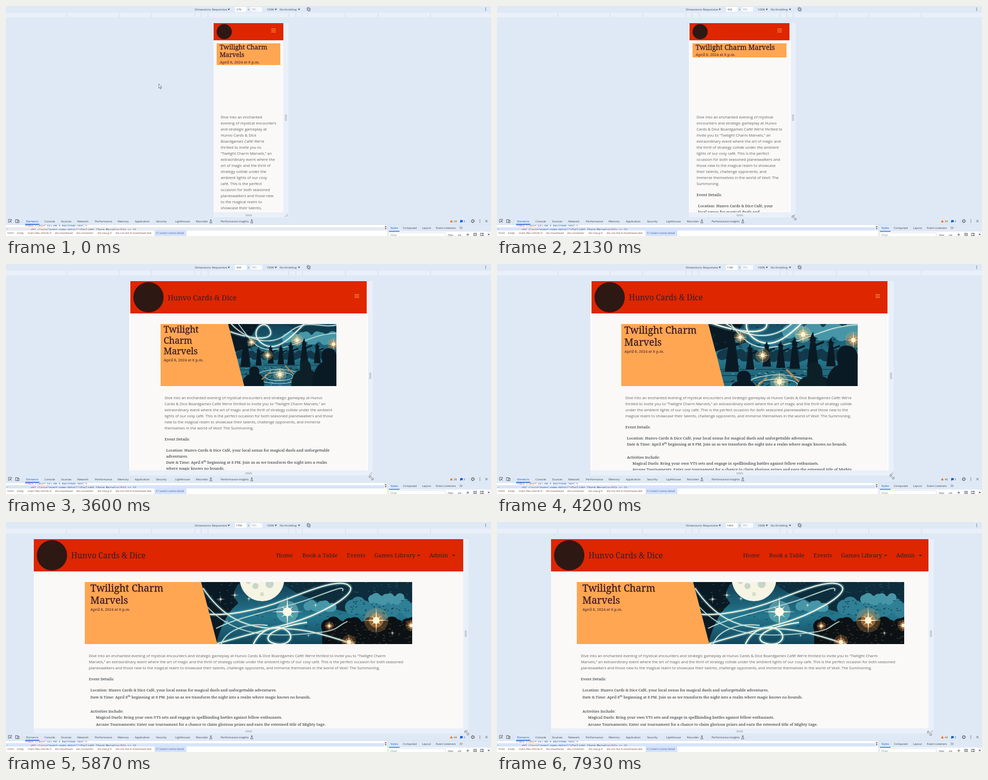
These frames come from a looping animation (960 by 456 pixels, 8 s). An HTML page:

```html
<!DOCTYPE html>
<html lang="en">
<head>
<meta charset="utf-8">
<title>Responsive event page</title>
<style>
html, body { margin: 0; width: 100%; height: 100%; overflow: hidden; background: #dfe9f6; }
#stage { position: relative; width: 960px; height: 456px; overflow: hidden; }
#stage div, #stage svg { position: absolute; }
#chrome, #art-day, #art-night { left: 0; top: 0; }
#chrome text { font-family: "Open Sans", sans-serif; white-space: pre; }
#chrome .mono { font-family: "DejaVu Sans Mono", monospace; font-size: 5.5px; }
#frame { top: 34px; height: 375px; background: #fff; overflow: hidden; }
#page { top: 0; height: 100%; background: #faf9f8; overflow: hidden; color: #212529;
  font: 7.67px/12px "Noto Serif", serif; }
#head { left: 0; top: 0; width: 100%; background: #de2600; color: #2e1f2a; }
#logo { left: 6px; top: 2px; border-radius: 50%; background: #2d1813; }
#name { left: 74px; top: 19.5px; line-height: 25px; white-space: nowrap; }
#menu { right: 15px; width: 9px; height: 1.5px; background: #ffa652; box-shadow: 0 3px #ffa652, 0 6px #ffa652; }
#nav { right: 0; top: 22px; height: 20px; font-size: 11.5px; line-height: 20px; white-space: nowrap; }
#nav i { position: absolute; top: 9px; border: 3px solid transparent; border-top-color: #2e1f2a; border-bottom: 0; }
#banner { background: #ffa652; overflow: hidden; color: #3a1a26; }
#stage #title { position: relative; -webkit-text-stroke: .3px #3a1a26; }
#stage #when { position: relative; }
#pic { top: 0; right: 0; height: 100%; clip-path: polygon(0 0, 100% 0, 100% 100%, 32px 100%); }
#pic svg { width: 100%; height: 100%; }
#body { height: 300px; }
#stage #body div { position: relative; }
#intro { color: #626266; font: 7.62px/12px "Open Sans", sans-serif; margin-bottom: 10px; }
#event { margin-bottom: 10px; }
#body .item { margin-left: 3px; }
#body .sub { margin-left: 14px; }
#acts { margin-top: 14px; }
sup { font-size: .75em; line-height: 0; vertical-align: .45em; }
.bar { background: #e9f0f9; }
.grip { background: #c9cdd5; }
</style>
</head>
<body>
<div id="stage">
  <svg id="chrome" width="960" height="456"></svg>
  <div id="right" class="bar"></div>
  <div id="bottom" class="bar"></div>
  <div id="gripR" class="grip"></div>
  <div id="gripB" class="grip"></div>
  <svg id="corner" width="8" height="8" stroke="#8a9099" stroke-width=".8"><path d="M1 7L7 1M4 7L7 4"/></svg>
  <div id="frame"><div id="page">
    <div id="head">
      <div id="logo"></div>
      <div id="name">Hunvo Cards &amp; Dice</div>
      <div id="menu"></div>
      <div id="nav"></div>
    </div>
    <div id="banner">
      <div id="title">Twilight Charm Marvels</div>
      <div id="when">April 8, 2024 at 8 p.m.</div>
      <div id="pic">
        <svg id="art-day" viewBox="0 0 214 123" preserveAspectRatio="xMidYMid slice"></svg>
        <svg id="art-night" viewBox="0 0 418 123" preserveAspectRatio="xMidYMid slice"></svg>
      </div>
    </div>
    <div id="body">
      <div id="intro"></div>
      <div id="event">Event Details:</div>
      <div id="place" class="item"></div>
      <div id="date" class="item"></div>
      <div id="acts" class="item">Activities Include:</div>
      <div id="duels" class="sub">Magical Duels: Bring your own VTS sets and engage in spellbinding battles against fellow enthusiasts.</div>
      <div class="sub">Arcane Tournaments: Enter our tournament for a chance to claim glorious prizes and earn the esteemed title of Mighty Sage.</div>
    </div>
  </div></div>
  <svg id="arrow" width="8" height="12"><path d="M.5 .5V9L2.5 7.2L3.9 10.4L5.2 9.8L3.8 6.7H6.4Z" fill="#fff" stroke="#222" stroke-width=".6"/></svg>
  <svg id="sizer" width="10" height="10"><path d="M1 1H4.5L3.4 2.1L7.9 6.6L9 5.5V9H5.5L6.6 7.9L2.1 3.4L1 4.5Z" fill="#fff" stroke="#333" stroke-width=".6"/></svg>
</div>
<script>
const $ = id => document.getElementById(id);
const place = (id, o) => {
  for (const k in o) $(id).style[k] = typeof o[k] === 'number' ? o[k] + 'px' : o[k];
};
const show = (id, on) => { $(id).style.display = on ? '' : 'none'; };

// SVG markup helpers
const rect = (x, y, w, h, fill, extra = '') => `<rect x="${x}" y="${y}" width="${w}" height="${h}" fill="${fill}" ${extra}/>`;
const text = (x, y, s, fill = '#3c4147', extra = '') => `<text x="${x}" y="${y + 2}" font-size="5.6" fill="${fill}" ${extra}>${s}</text>`;
const line = (d, color, w = .8, extra = '') => `<path d="${d}" fill="none" stroke="${color}" stroke-width="${w}" ${extra}/>`;
const shape = (d, fill) => `<path d="${d}" fill="${fill}"/>`;
const disc = (x, y, r, fill, extra = '') => `<circle cx="${x}" cy="${y}" r="${r}" fill="${fill}" ${extra}/>`;
const caret = x => shape(`M${x} 5.5h4l-2 3z`, '#3c4147');
const dots = (x, y) => [-2.5, 0, 2.5].map(d => disc(x, y + d, .7, '#3c4147')).join('');
const flask = x => line(`M${x} 424h3M${x + .8} 424v2L${x - .8} 430h4.6L${x + 2.2} 426v-2`, '#3c4147', .7);

function chrome() {
  const ink = '#3c4147', blue = '#0b57d0', edge = '#cdd9e8';
  let s = rect(0, 0, 960, 456, '#dfe9f6') + rect(0, 13.5, 960, 9, '#e9f0fa');
  for (const w of [320, 375, 425, 768, 1024, 1440])
    s += line(`M${480 - w / 4} 13.5v9M${480 + w / 4} 13.5v9`, edge, 1);
  s += text(374, 6.5, 'Dimensions: Responsive') + caret(439) +
    rect(453, 2, 23, 9.5, '#fff', 'rx="1"') + text(461, 6.5, '276', ink, 'id="wide" text-anchor="middle"') +
    text(478.5, 6.5, '×') + rect(484, 2, 23, 9.5, '#f8fafd', 'rx="1"') +
    text(491, 6.5, '751', '#8b9097', 'text-anchor="middle"') +
    text(516, 6.5, '100%') + caret(532) + text(542, 6.5, 'No throttling') + caret(578) +
    rect(597.3, 3.5, 3.4, 6, 'none', `rx=".8" stroke="${ink}" transform="rotate(45 599 6.5)"`) +
    line('M595.3 5.5a4 4 0 0 1 3.4 -3.3M602.7 7.5a4 4 0 0 1 -3.4 3.3', ink) + dots(949.5, 6.5);

  // elements panel
  const tag = '#8e2450', attr = '#9a5220', val = '#1f4fa3';
  const span = (c, t) => `<tspan fill="${c}">${t}</tspan>`;
  const open = (n, c) => span(tag, '&lt;' + n) + span(attr, ' class') + span(tag, '="') + span(val, c) + span(tag, '"&gt;');
  s += rect(0, 433, 960, 23, '#fff') + rect(0, 438.5, 748, 6, '#e7eaef', 'id="row"') +
    text(38, 434.5, '▾' + open('div', 'col-md-4 masthead-text'), ink, 'class="mono"') +
    text(49, 443, open('h1', 'event-name-detail') + 'Twilight Charm Marvels' + span(tag, '&lt;/h1&gt;') + span('#777', ' == $0'), ink, 'class="mono"') +
    text(0, 441, '…', ink) + rect(748, 433, 7, 11.5, '#f2f4f7') +
    shape('M749.5 438.5h4l-2 -2.5zM749.5 440.5h4l-2 2.5z', '#555') +
    rect(0, 444.5, 755, 11.5, '#fff') + line('M0 444.5H755', edge, .6);
  s += rect(294, 444.5, 63, 11.5, '#d3e3fd');
  const crumbs = [[3, 'html'], [22, 'body'], [43, 'main.flex-shrink-0'], [97, 'div.masthead'], [139, 'div.container'],
    [181, 'div.row.g-0'], [217, 'div.col-md-4.masthead-text']];
  for (const [x, t] of crumbs) s += text(x, 450, t, '#7a5142');
  s += text(297, 450, 'h1.event-name-detail', '#5a5f9c');

  // tab bar
  s += rect(0, 420, 960, 13.5, '#dfe9f6') + line('M0 433.5H960', edge, .7);
  const tabs = [[76, 'Console'], [109, 'Sources'], [141, 'Network'], [176, 'Performance'], [221, 'Memory'], [255, 'Application'],
    [297, 'Security'], [335, 'Lighthouse'], [376, 'Recorder'], [425, 'Performance insights']];
  for (const [x, t] of tabs) s += text(x, 426.5, t);
  s += text(40, 426.5, 'Elements', blue) + rect(38, 432, 28, 1.5, blue) + flask(404) + flask(485) +
    line('M11 425v-2H5v6h2M8 426l3.5 3.5M8 429v-3h3', ink) + rect(19, 423.5, 5, 6, 'none', `stroke="${ink}" stroke-width=".8"`) +
    rect(23, 425.5, 3, 4, '#dfe9f6', `stroke="${ink}" stroke-width=".8"`) + line('M32 423v8', edge) +
    shape('M881.5 424l2.8 5h-5.6z', '#e8711a') + text(886, 426.5, '34', '#8a3b00', 'id="warn"') +
    shape('M899 424.5h5v4h-3l-2 1.5z', blue) + text(905.5, 426.5, '3', blue) +
    line('M917 423v8', edge) + disc(924, 426.5, 2.4, 'none', `stroke="${ink}"`) +
    disc(924, 426.5, 3.4, 'none', `stroke="${ink}" stroke-width=".9" stroke-dasharray="1.2 1.47"`) +
    dots(938, 426.5) + line('M948.8 424.3l4.4 4.4M953.2 424.3l-4.4 4.4', ink);

  // styles pane
  s += rect(755.5, 433.5, 205, 13, '#dfe9f6') + line('M755.5 433.5V456', edge, 1) + line('M755 446.7H960', edge, .6) +
    text(761, 440, 'Styles', blue) + rect(758, 446, 21, 1.3, blue) + text(785.5, 440, 'Computed') + text(823.5, 440, 'Layout') +
    text(851, 440, 'Event Listeners') + line('M898 437.5l2.3 2.3l-2.3 2.3M901 437.5l2.3 2.3l-2.3 2.3', ink) +
    rect(757.5, 449.5, 112, 9, '#fff', `stroke="${edge}" stroke-width=".8"`) + text(761, 453.5, 'Filter', '#8b9097') +
    text(874, 453.5, ':hov') + text(893, 453.5, '.cls') + line('M914 450.5v5.5M911.2 453.3h5.6', ink) +
    rect(926, 450.5, 5, 5, 'none', `stroke="${ink}" stroke-width=".8"`) + line('M926 453h5', ink) +
    rect(939, 450.5, 6, 5, 'none', `stroke="${ink}" stroke-width=".8"`) + line('M942.5 450.5v5', ink) +
    rect(952, 447, 8, 9, '#f2f4f7') + shape('M953.5 454h4l-2 -3z', '#555');
  $('chrome').innerHTML = s;
}

// Banner art
const cream = '#f6f4e2', dark = '#0a1a24';
let seed = 7;
const rnd = (a, b) => a + (b - a) * ((seed = seed * 16807 % 2147483647) / 2147483647);
function flecks(n, x0, y0, x1, y1, color) {
  let d = '';
  while (n--) d += `M${rnd(x0, x1)} ${rnd(y0, y1)}l${rnd(1, 4)} ${rnd(-2, 2)}`;
  return line(d, color, 1, 'stroke-linecap="round"');
}
function spark(x, y, r, color = cream) {
  let d = '';
  for (let i = 0; i < 16; i++) {
    const a = i * Math.PI / 8, k = i % 2 ? .13 : i % 4 ? .5 : 1;
    d += `${i ? 'L' : 'M'}${x + Math.cos(a) * r * k} ${y + Math.sin(a) * r * k}`;
  }
  return shape(d + 'Z', color);
}
const glow = (x, y, r, c) => disc(x, y, r, c, 'opacity=".25"') + disc(x, y, r * .6, c, 'opacity=".5"') +
  disc(x, y, r * .28, '#fff3cf') + spark(x, y, r * 1.1, '#fff3cf');
const swirl = (d, w) => line(d, '#6fc0cb', w * 3, 'opacity=".35"') + line(d, cream, w);
const puffs = (x0, x1, y, r, fill) => {
  let d = '';
  for (let x = x0, i = 0; x < x1; x += r * .75, i++) d += disc(x, y - r * .4 * Math.sin(i * 1.7), r, fill);
  return d;
};
const sky = (id, w) => `<defs><linearGradient id="${id}" x2="0" y2="1"><stop offset="0" stop-color="#124056"/>` +
  `<stop offset=".55" stop-color="#25778d"/><stop offset="1" stop-color="#11445a"/></linearGradient></defs>` + rect(0, 0, w, 124, `url(#${id})`);

function nightArt() {
  let s = sky('n', 418);
  s += shape('M0 0H78Q56 22 74 42Q44 66 30 124H0Z', dark) + shape('M160 0H418V40Q340 30 300 62Q250 52 222 34Q184 24 160 0Z', '#0d2c3c');
  s += flecks(50, 0, 0, 80, 124, '#1f6478') + flecks(70, 170, 0, 418, 44, '#1c6075') + flecks(50, 90, 40, 280, 124, '#0f3c50');
  s += puffs(212, 262, 48, 9, '#4696a8') + puffs(300, 418, 50, 15, '#2f7f95') + puffs(340, 400, 34, 9, '#4696a8') + flecks(40, 290, 36, 418, 66, dark);
  s += disc(121, -6, 44, cream) + disc(108, 8, 6, '#c7d5c8') + disc(136, 4, 8, '#c7d5c8') + disc(121, 24, 4, '#d8ddcc') + disc(94, -1, 5, '#d0dacb');
  s += puffs(252, 424, 88, 14, '#0b1114') + rect(240, 92, 178, 32, '#0b1114') + flecks(90, 246, 78, 418, 123, '#5d4a32');
  s += swirl('M0 62C40 70 110 58 170 34S282 -8 295 9S232 66 176 82S70 110 30 123', 2.4) +
    swirl('M30 92C80 66 160 54 214 34S286 6 280 18', 1.2) +
    swirl('M4 12C40 66 84 92 150 92S250 108 304 123', 2) +
    swirl('M0 34C44 92 100 110 190 104S260 92 290 78', 1.1) +
    swirl('M104 123C118 92 152 82 170 96S172 128 146 122S128 92 210 80', 2.6) +
    swirl('M40 123C50 96 90 80 132 86', 1.4);
  s += disc(171, 59, 22, '#8fd0d6', 'opacity=".45"') + disc(171, 59, 9, '#fffbe8') + spark(171, 59, 32, '#fffbe8');
  for (const [x, y, r] of [[39, 34, 9], [67, 26, 9], [95, 33, 7], [227, 46, 6], [52, 78, 4], [213, 106, 5], [379, 101, 7]]) s += spark(x, y, r);
  s += glow(347, 76, 24, '#ee9a4c') + glow(293, 119, 14, '#e58b45') + glow(416, 86, 11, '#ee9a4c') + glow(254, 87, 9, '#e58b45');
  $('art-night').innerHTML = s;
}

const person = (x, y, h, fill) => disc(x, y, h * .1, fill) +
  shape(`M${x - h * .18} ${y - h * .05}h${h * .36}l${-h * .14} ${-h * .06}l${-h * .03} ${-h * .16}l${-h * .09} ${h * .16}z`, fill) +
  shape(`M${x - h * .09} ${y + h * .08}h${h * .18}l${h * .1} ${h * .8}h${-h * .38}z`, fill) +
  line(`M${x} ${y + h * .2}l${h * .36} ${-h * .14}`, fill, h * .07);

function dayArt() {
  let s = sky('d', 214);
  s += shape('M0 0H60L30 50L0 60Z', dark) + shape('M110 0H214V40Q160 24 110 0Z', '#103a4c') + flecks(60, 0, 0, 214, 60, '#0d3344') +
    puffs(116, 214, 28, 10, '#4696a8') + puffs(20, 214, 62, 7, '#12394a') + rect(0, 76, 214, 48, '#236a7e');
  for (let i = 0; i < 5; i++) s += line(`M0 ${82 + i * 9}H214`, '#103c4e', 1);
  s += flecks(60, 20, 78, 180, 123, '#5fb0bc') + flecks(50, 20, 78, 214, 123, dark);
  s += swirl('M0 14C50 32 94 34 82 10S38 18 66 38S120 30 150 0', 2.2) + swirl('M6 0C30 26 80 50 118 18S180 10 214 2', 1.4) +
    swirl('M20 0C50 40 60 58 104 48S170 20 214 18', 1);
  for (const [x, y, h] of [[34, 38, 54], [60, 54, 32], [84, 50, 32], [104, 50, 34], [124, 46, 40], [150, 40, 44], [176, 46, 36]]) s += person(x, y, h, dark);
  s += `<g fill="none" stroke="#d6f0ea"><ellipse cx="100" cy="104" rx="44" ry="14"/><ellipse cx="100" cy="104" rx="28" ry="8"/></g>`;
  s += glow(136, 32, 12, '#f0c57c') + glow(46, 36, 9, '#f0b066') + glow(78, 62, 10, '#f0c57c') + glow(102, 100, 13, '#f2dca4') + glow(208, 40, 12, '#ee9a4c');
  s += shape('M28 124q0 -22 14 -24q-3 -16 9 -16t10 15q10 4 10 25z', dark) + line('M66 110L84 94', '#c9864a', 2) +
    shape('M124 124q2 -30 18 -32q-2 -20 10 -20t12 20q16 4 18 32z', '#0d2028') +
    shape('M166 124q2 -42 20 -48q-6 -28 12 -28q16 0 16 18v58z', dark) + line('M130 100L112 82', '#c9864a', 2.2);
  $('art-day').innerHTML = s;
}

// Copy, with line lengths in words for the settled widths
const intro = ('Dive into an enchanted evening of mystical encounters and strategic gameplay at Hunvo Cards &amp; Dice Boardgames Café! ' +
  'We\'re thrilled to invite you to “Twilight Charm Marvels,” an extraordinary event where the art of magic and the thrill of ' +
  'strategy collide under the ambient lights of our cosy café. This is the perfect occasion for both seasoned planeswalkers and ' +
  'those new to the magical realm to showcase their talents, challenge opponents, and immerse themselves in the world of ' +
  'Vexil: The Summoning.').split(' ');
const where = 'Location: Hunvo Cards &amp; Dice Café, your local nexus for magical duels and unforgettable adventures.'.split(' ');
const dated = ('Date &amp; Time: April 8<sup>th</sup> beginning at 8 PM. Join us as we transform the night into a realm ' +
  'where magic knows no bounds.').split(' ');
const cuts = {
  phone: [[4, 4, 4, 4, 3, 5, 4, 4, 7, 4, 5, 5, 4, 4, 5, 3, 3, 3], [4], [5]],
  small: [[10, 11, 10, 14, 12, 11, 10], [12], [15]],
  medium: [[13, 15, 16, 16, 13], [14], [19]],
  large: [[26, 31], [], []]
};
const cutFor = w => w < 300 ? 'phone' : Math.abs(w - 576) < 13 ? 'small' : w >= 768 && w < 992 ? 'medium' : w >= 1400 ? 'large' : '';
let lastCut;
function wrap(key) {
  if (key === lastCut) return;
  lastCut = key;
  [['intro', intro], ['place', where], ['date', dated]].forEach(([id, words], i) => {
    let at = 0;
    const lines = (key ? cuts[key][i] : []).map(n => words.slice(at, at += n).join(' '));
    $(id).innerHTML = [...lines, words.slice(at).join(' ')].join('<br>');
    $(id).style.whiteSpace = key ? 'nowrap' : 'normal';
  });
}

// Motion: [step, values...]; the page layout trails the frame by LAG steps
const STEPS = 120, LOOP = 8000, LAG = .3;
const widths = [[23, 276], [34, 430], [40, 576], [47, 780], [54, 944], [60, 1096], [73, 1464], [74, 1472], [86, 1688],
  [88, 1700], [97, 1764], [100, 1764], [106, 1722], [113, 1644], [119, 1494]];
// pointer: x from the right edge of the page, y
const pointer = [[2, -247, 154], [15, -4, 417], [19, 5, 416], [23, 5, 416], [40, 8, 421], [54, 7, 423], [74, 8, 419],
  [88, 7, 417], [97, 6, 417], [119, 2, 418]];
const smooth = u => u * u * (3 - 2 * u);
function tween(keys, s, ease = u => u) {
  if (s <= keys[0][0]) return keys[0].slice(1);
  const i = keys.findIndex(k => k[0] > s);
  if (i < 0) return keys[keys.length - 1].slice(1);
  const a = keys[i - 1], b = keys[i], u = ease((s - a[0]) / (b[0] - a[0]));
  return a.slice(1).map((v, j) => v + (b[j + 1] - v) * u);
}
const pick = (w, table) => table.filter(r => w >= r[0]).pop()[1];

function draw(s) {
  const w = 2 * Math.round(tween(widths, s)[0] / 2);
  const L = Math.round(480 - w / 4), R = Math.round(480 + w / 4);
  const P = 2 * Math.round(tween(widths, s - LAG)[0] / 4);
  const mid = w >= 768, big = w >= 1200;
  const box = pick(w, [[0, P], [576, 270], [768, 360], [992, 480], [1200, 570], [1400, 660]]);
  const side = (P - box) / 2;

  $('wide').textContent = w;
  $('warn').textContent = pick(s > 97 ? 1764 : w, [[0, 34], [768, 38], [992, 40], [1200, 42], [1400, 44]]);
  $('row').setAttribute('fill', s >= 22 ? '#d6e4fb' : '#e7eaef');

  const hover = s >= 18 && s < 23 ? '#d3deec' : '#e9f0f9';
  place('right', { left: R, top: 34, width: 10, height: 384.5, background: hover });
  place('bottom', { left: L, top: 409, width: R - L, height: 9.5, background: hover });
  place('gripR', { left: R + 3, top: 215, width: 4, height: 13 });
  place('gripB', { left: 474, top: 412.5, width: 13, height: 4 });
  place('corner', { left: R + 1.5, top: 410.5 });

  place('frame', { left: L, width: R - L });
  place('page', { left: Math.max(0, Math.floor((R - L - P) / 2)), width: P });
  place('head', { height: mid ? 64 : 34 });
  const d = mid ? 60 : 30;
  place('logo', { width: d, height: d });
  show('name', mid);
  place('name', { fontSize: Math.min(32, 21.2 + .009 * w) / 2 * .965 });
  show('menu', !big);
  place('menu', { top: mid ? 25.5 : 10.5 });
  show('nav', big);

  const bw = mid ? box - 12 : P - 12, size = Math.min(40, 22 + .015 * w) / 2;
  const pad = mid ? (big ? 11 : 6) : side + 6;
  place('banner', { left: mid ? side + 6 : 6, top: mid ? 85 : 39.5, width: bw, height: mid ? 123 : 'auto' });
  place('title', { marginLeft: pad, width: mid ? box / 3 - 12 : box - 22, fontSize: size * .97, lineHeight: size * 1.2 + 'px' });
  place('when', { marginLeft: pad });
  show('pic', mid);
  place('pic', { left: .322 * bw + 21.7 });
  show('art-night', big);
  show('art-day', !big);

  place('body', { left: side * mid + 14, top: mid ? 225 : 180, width: (mid ? box : P) - 28 });
  const gap = w >= 1400 ? 2 : 0;
  for (const id of ['place', 'date', 'duels']) place(id, { paddingBottom: gap });
  wrap(cutFor(w));

  const [x, y] = tween(pointer, s, s < 15 ? smooth : undefined);
  show('arrow', s < 18);
  show('sizer', s >= 18);
  place('arrow', { left: R + x, top: y });
  place('sizer', { left: R + x - 5, top: y - 4 });
}

$('nav').innerHTML = [[370, 'Home'], [318.5, 'Book a Table'], [230.5, 'Events'], [176, 'Games Library'], [67, 'Admin']]
  .map(([r, t]) => `<div style="left:${-r}px">${t}</div>`).join('') + '<i style="left:-91px"></i><i style="left:-22px"></i>';
chrome();
nightArt();
dayArt();
let last = -1;
function tick() {
  const s = Math.floor((performance.now() % LOOP + 4) / LOOP * STEPS) % STEPS;
  if (s !== last) draw(last = s);
  requestAnimationFrame(tick);
}
tick();
</script>
</body>
</html>
```
